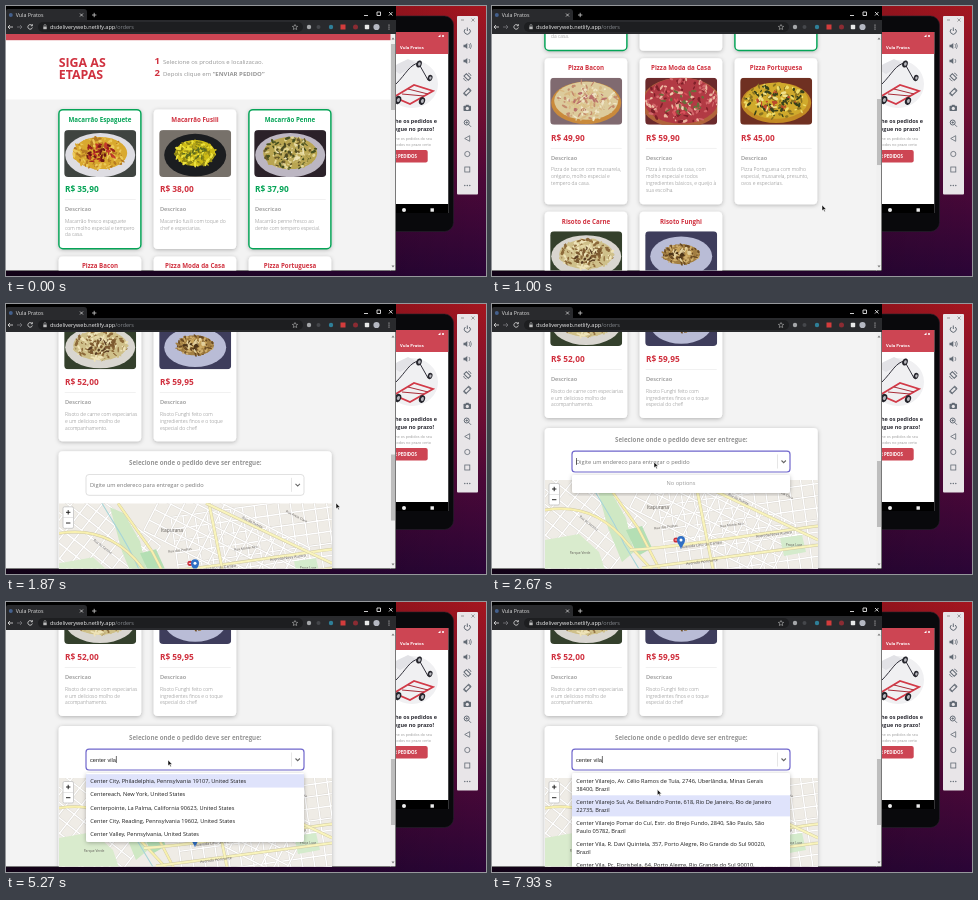
These frames come from a looping animation (480x270 px, 8000 ms). An HTML page:

```html
<!DOCTYPE html>
<html lang="pt">
<head>
<meta charset="utf-8">
<title>Vula Pratos</title>
<style>
  html, body { margin: 0; width: 100%; height: 100%; overflow: hidden; background: #14031c; }
  svg { display: block; width: 100vw; height: 100vh; font-family: "Open Sans", sans-serif; }
  text { white-space: pre; }
</style>
</head>
<body>
<svg id="stage" viewBox="0 0 480 270">
  <defs>
    <linearGradient id="wall" x2="0" y2="1">
      <stop offset="0" stop-color="#a5161f"/><stop offset=".3" stop-color="#7d102f"/>
      <stop offset=".65" stop-color="#4b0838"/><stop offset="1" stop-color="#2a0536"/>
    </linearGradient>
    <linearGradient id="shade">
      <stop offset="0" stop-color="#000" stop-opacity=".6"/><stop offset="1" stop-color="#000" stop-opacity="0"/>
    </linearGradient>
    <filter id="shadow" x="-10%" y="-10%" width="120%" height="125%">
      <feDropShadow dx="0" dy="1" stdDeviation="2" flood-opacity=".28"/>
    </filter>
    <clipPath id="view"><rect y="28" width="385" height="236.5"/></clipPath>
    <clipPath id="photo"><rect width="72" height="47" rx="4"/></clipPath>
    <clipPath id="mapArea"><rect x="53" y="176" width="273" height="120"/></clipPath>
    <clipPath id="screen"><rect x="380" y="26" width="62.5" height="181"/></clipPath>
  </defs>
</svg>
<script>
const RED = '#d0313f', HEADER = '#cd4553', GREEN = '#06a457', GREY = '#959595', LOOP = 8000, END_SCROLL = 428.5;
const BOLD = ' font-weight="700" ', LIGHT = ' font-weight="300" ', MIDDLE = ' text-anchor="middle" ', END = ' text-anchor="end" ';

const rect = (x, y, w, h, fill, more = '') =>
  `<rect x="${x}" y="${y}" width="${w}" height="${h}" fill="${fill}" ${more}/>`;
const dot = (x, y, r, fill, more = '') => `<circle cx="${x}" cy="${y}" r="${r}" fill="${fill}" ${more}/>`;
const oval = (x, y, rx, ry, fill, angle = 0) =>
  `<ellipse rx="${rx}" ry="${ry}" fill="${fill}" transform="translate(${x} ${y}) rotate(${angle})"/>`;
const line = (d, stroke, width = 1, more = '') =>
  `<path d="${d}" fill="none" stroke="${stroke}" stroke-width="${width}" ${more}/>`;
const shape = (d, fill) => `<path d="${d}" fill="${fill}"/>`;
const text = (x, y, str, size, fill, more = '') =>
  `<text x="${x}" y="${y}" font-size="${size}" fill="${fill}" ${more}>${str}</text>`;

function random(seed) {
  return () => (seed = (seed * 16807) % 2147483647) / 2147483647;
}

// A dish: backdrop, plate, food scattered over an ellipse, topping heaped in the middle.
function dish(seed, { backdrop, plate, rim = 8, rx, ry, food, topping }) {
  const rnd = random(seed * 7919);
  const scatter = (count, reach, colors) => {
    let out = '';
    for (let i = 0; i < count; i++) {
      const a = rnd() * 6.283, d = Math.sqrt(rnd()) * reach;
      out += oval((36 + Math.cos(a) * d * rx).toFixed(1), (23 + Math.sin(a) * d * ry).toFixed(1),
        1 + rnd() * 2.2, .6 + rnd() * .9, colors[Math.floor(rnd() * colors.length)], Math.floor(rnd() * 180));
    }
    return out;
  };
  return rect(0, 0, 72, 47, backdrop) + oval(36, 25, rx + rim, ry + rim * .75, plate) +
    oval(36, 23, rx, ry, food[0]) + scatter(150, 1, food) + scatter(45, .6, topping);
}

const rows = [{ top: 103.5, height: 139.5, lead: 1.1 }, { top: 250.5, height: 146, lead: 0 }, { top: 404, height: 138.5, lead: 0 }];
const products = [
  { title: 'Macarrão Espaguete', price: '35,90', selected: true,
    lines: ['Macarrão fresco espaguete', 'com molho especial e tempero', 'da casa.'],
    photo: { backdrop: '#3f4440', plate: '#dedde2', rx: 27, ry: 16, food: ['#d9a92f', '#ecc95a', '#b67a22'], topping: ['#9c1f1c', '#c23a2a', '#6e1613'] } },
  { title: 'Macarrão Fusili', price: '38,00',
    lines: ['Macarrão fusili com toque do', 'chef e especiarias.'],
    photo: { backdrop: '#77716a', plate: '#1b1d20', rim: 11, rx: 20, ry: 13, food: ['#cdbb16', '#ece13d', '#8f8614'], topping: ['#e9dc30', '#b5a51c', '#5c6a1e'] } },
  { title: 'Macarrão Penne', price: '37,90', selected: true,
    lines: ['Macarrão penne fresco ao', 'dente com tempero especial.'],
    photo: { backdrop: '#2b2129', plate: '#bcb6c2', rx: 27, ry: 16, food: ['#b9a551', '#e2d596', '#6b5a28', '#49511f'], topping: ['#ece2b4', '#c2b062', '#4d4a22'] } },
  { title: 'Pizza Bacon', price: '49,90',
    lines: ['Pizza de bacon com mussarela,', 'orégano, molho especial e', 'tempero da casa.'],
    photo: { backdrop: '#806a70', plate: '#c98a3c', rim: 3, rx: 32, ry: 19, food: ['#dccb9c', '#f0e6c6', '#c48b6c', '#d8b983'], topping: ['#eee3c4', '#b9706a', '#dcc48c'] } },
  { title: 'Pizza Moda da Casa', price: '59,90',
    lines: ['Pizza à moda da casa, com', 'molho especial e todos', 'ingredientes básicos, e queijo à', 'sua escolha.'],
    photo: { backdrop: '#6b2a2c', plate: '#b0633a', rim: 3, rx: 37, ry: 23, food: ['#b23a44', '#d3666a', '#ecb7a0', '#7f2029'], topping: ['#d9505a', '#f0cdb0', '#66703a'] } },
  { title: 'Pizza Portuguesa', price: '45,00',
    lines: ['Pizza Portuguesa com molho', 'especial, mussarela, presunto,', 'ovos e especiarias.'],
    photo: { backdrop: '#6f3022', plate: '#c38a24', rim: 3, rx: 32, ry: 18, food: ['#d0aa2c', '#efdc6a', '#8a7320', '#36401a'], topping: ['#f0e08a', '#3a421c', '#bd4a2a'] } },
  { title: 'Risoto de Carne', price: '52,00',
    lines: ['Risoto de carne com especiarias', 'e um delicioso molho de', 'acompanhamento.'],
    photo: { backdrop: '#34402c', plate: '#d9d6d0', rx: 27, ry: 15, food: ['#cfc08a', '#eee3b8', '#8d6a3a'], topping: ['#5a3d22', '#e2d5a4', '#7d5a30'] } },
  { title: 'Risoto Funghi', price: '59,95',
    lines: ['Risoto Funghi feito com', 'ingredientes finos e o toque', 'especial do chef!'],
    photo: { backdrop: '#3e3d5c', plate: '#b9bcd6', rim: 13, rx: 18, ry: 10, food: ['#a37f42', '#cfae6c', '#6a4a22'], topping: ['#c9a45c', '#4e3518', '#e2cf9c'] } }
];

function card({ title, price, lines, photo, selected }, i) {
  const { top, height, lead } = rows[Math.floor(i / 3)];
  const color = selected ? GREEN : RED;
  return `<g transform="translate(${52.7 + (i % 3) * 95} ${top})">` +
    rect(0, 0, 82.5, height, '#fff', 'rx="4" filter="url(#shadow)"') +
    (selected ? rect(.2, .2, 82, height - .5, 'none', `rx="4" stroke="${GREEN}" stroke-width="1.5"`) : '') +
    text(41.3, 11.8 + lead, title, 6.2, color, BOLD + MIDDLE) +
    `<g transform="translate(5.5 ${19.5 + lead})" clip-path="url(#photo)">${dish(i + 1, photo)}</g>` +
    text(6.3, 82.3, 'R$ ' + price, 8.3, color, BOLD) +
    rect(6, 89.7, 71, .5, '#e2e2e2') +
    text(6.3, 101.3, 'Descricao', 5.6, GREY, 'font-weight="600"') +
    lines.map((s, n) => text(6.3, 113.2 + n * 6.8, s, 5, '#808080', LIGHT)).join('') + '</g>';
}

// Evenly spaced parallel streets crossing a second family, turned as one block.
function streetGrid(x, y, angle, count, length, gap) {
  let d = '';
  for (let i = 0; i <= count; i++) d += `M${i * gap},0v${length}`;
  for (let i = 0; i <= length / gap; i++) d += `M0,${i * gap}h${count * gap}`;
  return `<g transform="translate(${x} ${y}) rotate(${angle})">` + line(d, '#d8d4ce', 2.1) + line(d, '#fff', 1.4) + '</g>';
}

function cityMap() {
  const label = (x, y, s, angle = 0, size = 3.3) =>
    text(0, 0, s, size, '#5f5b57', `${MIDDLE} transform="translate(${x} ${y}) rotate(${angle})"`);
  const roads = (list, color, width) =>
    list.map(d => line(d, '#cfc8a4', width + .8) + line(d, color, width)).join('');
  return `<g clip-path="url(#mapArea)">` + rect(53, 176, 273, 120, '#efece6') +
    streetGrid(60, 145, 38, 10, 130, 12) + streetGrid(165, 190, -8, 15, 100, 12) + streetGrid(165, 150, 27, 13, 60, 12) +
    shape('M53,236l34,-6 20,18 10,30h-64z', '#d9ebcd') +
    shape('M104,180l14,6 16,28 8,34 -12,10 -14,-34z', '#cfe8c4') +
    shape('M134,226l16,-4 10,22 -14,8z', '#b4dfb4') +
    shape('M288,234l22,-3 4,17 -22,4z', '#d4ebcc') +
    line('M96,176C110,200 122,216 132,240L150,270', '#a8d5d8', 1.1) +
    roads(['M53,206C90,200 116,214 136,240L164,270', 'M112,176L146,224L170,270'], '#f8f0ae', 2) +
    roads(['M138,246C180,244 250,232 326,222', 'M150,264L326,241', 'M203,176L222,270', 'M200,176L326,236'], '#f9f4bc', 2.2) +
    label(166, 204.5, 'Itapurana', 0, 4.9) + label(96, 220, 'Rua do Sereno', 38) + label(88, 250, 'Parque Verde') +
    label(210, 242, 'Avenida Lírio do Campo', -7, 3.7) + label(282, 231.5, 'Avenida Nova Aurora', -7, 3.7) +
    label(210, 259, 'Avenida Horizonte', -7, 3.7) + label(174, 224, 'Rua das Pedras', -7) +
    label(302, 242, 'Praça Luar') + label(246, 196, 'Rua do Poente', 27) + label(290, 190, 'Rua Areia Clara', 27) +
    label(240, 222, 'Rua Monte Alto', -7) +
    dot(184, 236, 2.6, '#cc2f3c') + rect(182.8, 235.6, 2.4, .8, '#fff') +
    shape('M189,245.5c-1,-4 -4,-6 -4,-9.5a4,4 0 0 1 8,0c0,3.5 -3,5.5 -4,9.5z', '#2f6fc4') + dot(189, 236, 1.5, '#fff') +
    rect(57, 179.5, 10.5, 21.5, '#fff', 'rx="1.5" stroke="#bbb" stroke-width=".7"') + rect(57, 190, 10.5, .5, '#ccc') +
    line('M60,185h4.4M62.2,182.8v4.4M60,195.7h4.4', '#111', .9) + '</g>';
}

const cities = [['Center City, Philadelphia, Pennsylvania 19107, United States'], ['Centereach, New York, United States'],
  ['Centerpointe, La Palma, California 90623, United States'], ['Center City, Reading, Pennsylvania 19602, United States'],
  ['Center Valley, Pennsylvania, United States']];
const shops = [
  ['Center Vilarejo, Av. Célio Ramos de Tuía, 2746, Uberlândia, Minas Gerais', '38400, Brazil'],
  ['Center Vilarejo Sul, Av. Belisandro Ponte, 618, Rio De Janeiro, Rio de Janeiro', '22735, Brazil'],
  ['Center Vilarejo Pomar do Cuí, Estr. do Brejo Fundo, 2840, São Paulo, São', 'Paulo 05782, Brazil'],
  ['Center Vila, R. Davi Quintela, 357, Porto Alegre, Rio Grande do Sul 90020,', 'Brazil'],
  ['Center Vila, Pc. Florisbela, 64, Porto Alegre, Rio Grande do Sul 90010,', 'Brazil']];

const menuBox = height => rect(80, 171, 218, height, '#fff', 'rx="2" filter="url(#shadow)"');
function optionMenu(id, options, pitch, height) {
  return `<g id="${id}">` + menuBox(height) + rect(80, 172.2, 218, pitch, '#dfe3fb', `id="${id}Active"`) +
    options.map((lines, i) => lines.map((s, n) =>
      text(84.3, 181 + i * pitch + n * 7.9, s, 5.62, '#1c1c1c')).join('')).join('') + '</g>';
}

const page = rect(0, 28, 385, 900, '#f3f3f3') + rect(0, 28, 385, 65.5, '#fff') + rect(0, 28, 385, 6.2, HEADER) +
  text(52.7, 61.3, 'SIGA AS', 12.4, RED, BOLD) + text(52.7, 73.3, 'ETAPAS', 12.4, RED, BOLD) +
  text(148.5, 58.2, '1', 9.5, RED, BOLD) + text(148.5, 70, '2', 9.5, RED, BOLD) +
  text(157, 57.7, 'Selecione os produtos e localizacao.', 6, GREY) +
  text(157, 69.5, `Depois clique em <tspan ${BOLD}>“ENVIAR PEDIDO”</tspan>`, 6, GREY) +
  products.map(card).join('') +
  `<g transform="translate(0 ${END_SCROLL})">` +
  rect(52.7, 124, 273, 180, '#fff', 'rx="4" filter="url(#shadow)"') +
  text(189.3, 137.7, 'Selecione onde o pedido deve ser entregue:', 6.17, GREY, BOLD + MIDDLE) + cityMap() +
  rect(80, 147.2, 218, 20.8, '#fff', 'id="field" rx="3"') +
  rect(285.3, 150.5, .5, 14, '#ccc') + line('M289.5,156.5l2.2,2.2 2.2,-2.2', '#666', 1.1) +
  text(84, 159.5, 'Digite um endereco para entregar o pedido', 5.65, '#777', 'id="hint"') +
  text(84, 159.5, '', 5.7, '#222', 'id="typed" font-family="Liberation Sans, sans-serif"') +
  rect(0, 154, .6, 7, '#111', 'id="caret"') +
  `<g id="notice">${menuBox(18)}${text(189, 181.3, '', 5.65, '#999', 'id="noticeText"' + MIDDLE)}</g>` +
  optionMenu('cities', cities, 13.35, 69) + optionMenu('shops', shops, 21.1, 110) + '</g>';

const browser = rect(0, 0, 390, 265, '#000') + shape('M0,14V5a2,2 0 0 1 2,-2H78a3,3 0 0 1 3,3V14z', '#292a2d') +
  rect(0, 14, 390, 14, '#292a2d') + dot(4.8, 9, 2, '#44608c') + text(9.7, 11, 'Vula Pratos', 5.3, '#dcdcdc') +
  line('M74,7.5l3,3m0,-3l-3,3M86,9h4.4m-2.2,-2.2v4.4', '#d0d0d0', .8) +
  line('M358,9.5h4M371,6h3.5v3.5h-3.5zM383,6l3.5,3.5m0,-3.5l-3.5,3.5', '#e4e4e4', .9) +
  rect(32, 16, 265, 10, '#1d1e20', 'rx="5"') +
  line('M7,21H2m2,-2l-2,2 2,2M26,19.5a2.3,2.3 0 1 0 .4,2M26.4,18.2v1.6h-1.6', '#e4e4e4', .8) +
  line('M11,21h5m-2,-2l2,2 -2,2', '#77787c', .8) +
  rect(37.3, 20.5, 3.4, 2.7, '#bbb') + line('M38,20.5v-1a1,1 0 0 1 2,0v1', '#bbb', .6) +
  text(44, 23, 'dsdeliveryweb.netlify.app<tspan fill="#85888d">/orders</tspan>', 5.5, '#eee') +
  line('M289,18.5l.8,1.7 1.9,.2 -1.4,1.3 .4,1.8 -1.7,-.9 -1.7,.9 .4,-1.8 -1.4,-1.3 1.9,-.2z', '#ccc', .5) +
  dot(303, 21, 2.2, '#a5a7aa') + dot(312.5, 21, 2, '#45474b') + dot(325, 21, 2.2, '#2f7f98') +
  rect(334.5, 18.5, 5, 5, '#d33c3c') + dot(349.5, 21, 2.5, '#8b2c33') + rect(358.8, 18.8, 4.4, 4.4, '#e8e8e8', 'rx=".8"') +
  dot(370.5, 21, 3.1, '#b5b8c2') + [19, 21, 23].map(y => dot(383, y, .6, '#ddd')).join('') +
  `<g clip-path="url(#view)"><g id="page">${page}</g></g>` +
  rect(384.5, 28, 5, 236.5, '#f0f0f0') + rect(385, 38, 4, 66, '#bdbdbd', 'id="thumb"') +
  shape('M385.5,33.5l1.5,-2 1.5,2zM385.5,259.5l1.5,2 1.5,-2z', '#777');

const wheel = (x, y, r) => oval(x, y, r * .75, r, '#26262d', 20) + oval(x + .4, y, r * .35, r * .5, '#b8b8be', 20);
const phone = rect(352, 10, 95.5, 215.5, '#09090c', 'rx="9" stroke="#24232a" stroke-width=".6"') +
  `<g clip-path="url(#screen)">` + rect(380, 26, 62.5, 181, '#fff') + rect(380, 26, 62.5, 22, HEADER) +
  dot(437, 30, 1, '#fff') + shape('M432,31l2.5,-2.5v2.5z', '#fff') + text(394, 42.6, 'Vula Pratos', 4.2, '#fff', BOLD) +
  oval(406, 78, 26, 24, '#f0f0f2') + shape('M384,62l18,-9 10,5 -18,10z', '#e2e2e6') +
  line('M388,91L408,79L427,85L404,98Z', '#d23a48', 1.8) + line('M396,88L418,90M402,83L422,88', '#a92c38', 1) +
  line('M390,78C400,68 404,58 413,57M413,58L422,74', '#33323c', 1) +
  wheel(413, 58, 3.6) + wheel(424, 72, 3.2) + wheel(392, 94, 4.2) + wheel(416, 95, 4) +
  text(431, 117, 'Acompanhe os pedidos e', 5.5, '#2d2d35', BOLD + END) +
  text(428, 124.5, 'entregue no prazo!', 5.5, '#2d2d35', BOLD + END) +
  text(426, 133.5, 'Selecione os pedidos do seu', 3.7, '#999', END) +
  text(425, 139.5, 'entregue todos no prazo certo', 3.7, '#999', END) +
  rect(375, 144, 46.7, 12.5, HEADER, 'rx="2"') + text(411, 152, 'VER PEDIDOS', 4.4, '#fff', BOLD + END) +
  rect(380, 198, 62.5, 9.5, '#000') + dot(398, 204, 2, '#eee') + rect(424.5, 202.3, 3.4, 3.4, '#eee') + '</g>';

const INK = '#626a74', PANEL = '#e8e5e8';
const toolbar = rect(451, 10, 21, 178.5, PANEL, 'rx="1"') +
  line('M455,14h3M465.5,12.5l3,3m0,-3l-3,3', '#777', .7) +
  line('M459.3,23a3,3 0 1 0 4,0M461.3,21.5v3.5', INK) +
  [40, 55].map(y => shape(`M457.5,${y - 1.2}h1.6l2.2,-1.8v6l-2.2,-1.8h-1.6z`, INK)).join('') +
  line('M463,38a3,3 0 0 1 0,4M464.3,37a5,5 0 0 1 0,6M463,53a3,3 0 0 1 0,4', INK, .7) +
  [-45, 45].map((angle, i) => `<g transform="translate(461.3 ${71 + i * 15})">` +
    rect(-1.7, -3, 3.4, 6, 'none', `stroke="${INK}" transform="rotate(${angle})"`) +
    line('M-3.8,1a4,4 0 0 0 3,3M3.8,-1a4,4 0 0 0 -3,-3', INK, .8) + '</g>').join('') +
  rect(457.5, 99.8, 7.5, 5.2, INK, 'rx=".8"') + rect(459.8, 98.8, 3, 1.5, INK) + dot(461.3, 102.4, 1.6, PANEL) +
  dot(460.7, 116.5, 2.5, 'none', `stroke="${INK}"`) + line('M462.5,118.3l2.5,2.5M459.5,116.5h2.4M460.7,115.3v2.4', INK, .9) +
  line('M463.7,129.7v5.6l-5,-2.8z', INK, .8) + dot(461.3, 148, 2.6, 'none', `stroke="${INK}" stroke-width=".8"`) +
  rect(458.8, 161, 5, 5, 'none', `stroke="${INK}" stroke-width=".8"`) +
  [458.8, 461.3, 463.8].map(x => dot(x, 179.5, .7, INK)).join('');

const pointer = '<path id="pointer" d="M0,0V5.8L1.4,4.6L2.4,6.7L3.3,6.3L2.3,4.3H4.2Z" fill="#111" stroke="#fff" stroke-width=".5"/>';

const stage = document.getElementById('stage');
stage.insertAdjacentHTML('beforeend',
  rect(0, 0, 480, 270, 'url(#wall)') + rect(0, 0, 480, 270, 'url(#shade)') + phone + toolbar + browser + pointer);
const el = Object.fromEntries([...stage.querySelectorAll('[id]')].map(n => [n.id, n]));

const QUERY = 'center vila', OPEN = 2470, CITIES_AT = 3700, SHOPS_AT = 5330, HOVER_AT = 7420;
const keyTimes = [2900, 3050, 3190, 3330, 3480, 3620, 4400, 4560, 4720, 4880, 5060];
const scrollPath = [[70, 0], [1000, 198], [1530, 325], [1900, 412], [2050, END_SCROLL]];
const pointerPath = [[2050, 330, 199], [2200, 280, 186], [2420, 162, 158], [7200, 162, 158], [7520, 169, 203], [7720, 168, 201], [8000, 164.5, 183]];

function along(path, t) {
  const i = path.findIndex(p => p[0] > t);
  if (i === 0) return path[0].slice(1);
  if (i < 0) return path[path.length - 1].slice(1);
  const a = path[i - 1], b = path[i], k = (t - a[0]) / (b[0] - a[0]);
  return a.slice(1).map((v, n) => v + (b[n + 1] - v) * k);
}
const show = (node, on) => node.setAttribute('display', on ? 'inline' : 'none');
const set = (node, attrs) => Object.entries(attrs).forEach(([k, v]) => node.setAttribute(k, v));

function draw() {
  const t = performance.now() % LOOP;
  const [scroll] = along(scrollPath, t), [px, py] = along(pointerPath, t);
  const pressed = keyTimes.filter(k => k <= t), open = t >= OPEN;
  set(el.page, { transform: `translate(0 ${-scroll})` });
  set(el.thumb, { y: 38 + scroll * .2777 });
  set(el.pointer, { transform: `translate(${px} ${py})` });
  show(el.pointer, t >= 70);

  set(el.field, { stroke: open ? '#6f66cc' : '#ccc', 'stroke-width': open ? 1.2 : .6 });
  el.typed.textContent = QUERY.slice(0, pressed.length);
  show(el.hint, !pressed.length);
  const lastInput = pressed.length ? pressed[pressed.length - 1] : OPEN;
  show(el.caret, open && (t - lastInput) % 1200 < 600);
  set(el.caret, { x: 84 + (pressed.length ? el.typed.getComputedTextLength() : 0) });

  show(el.notice, open && t < CITIES_AT);
  el.noticeText.textContent = pressed.length ? 'Loading...' : 'No options';
  show(el.cities, t >= CITIES_AT && t < SHOPS_AT);
  show(el.shops, t >= SHOPS_AT);
  set(el.shopsActive, { y: t >= HOVER_AT ? 193.3 : 172.2 });
  requestAnimationFrame(draw);
}
draw();
</script>
</body>
</html>
```
